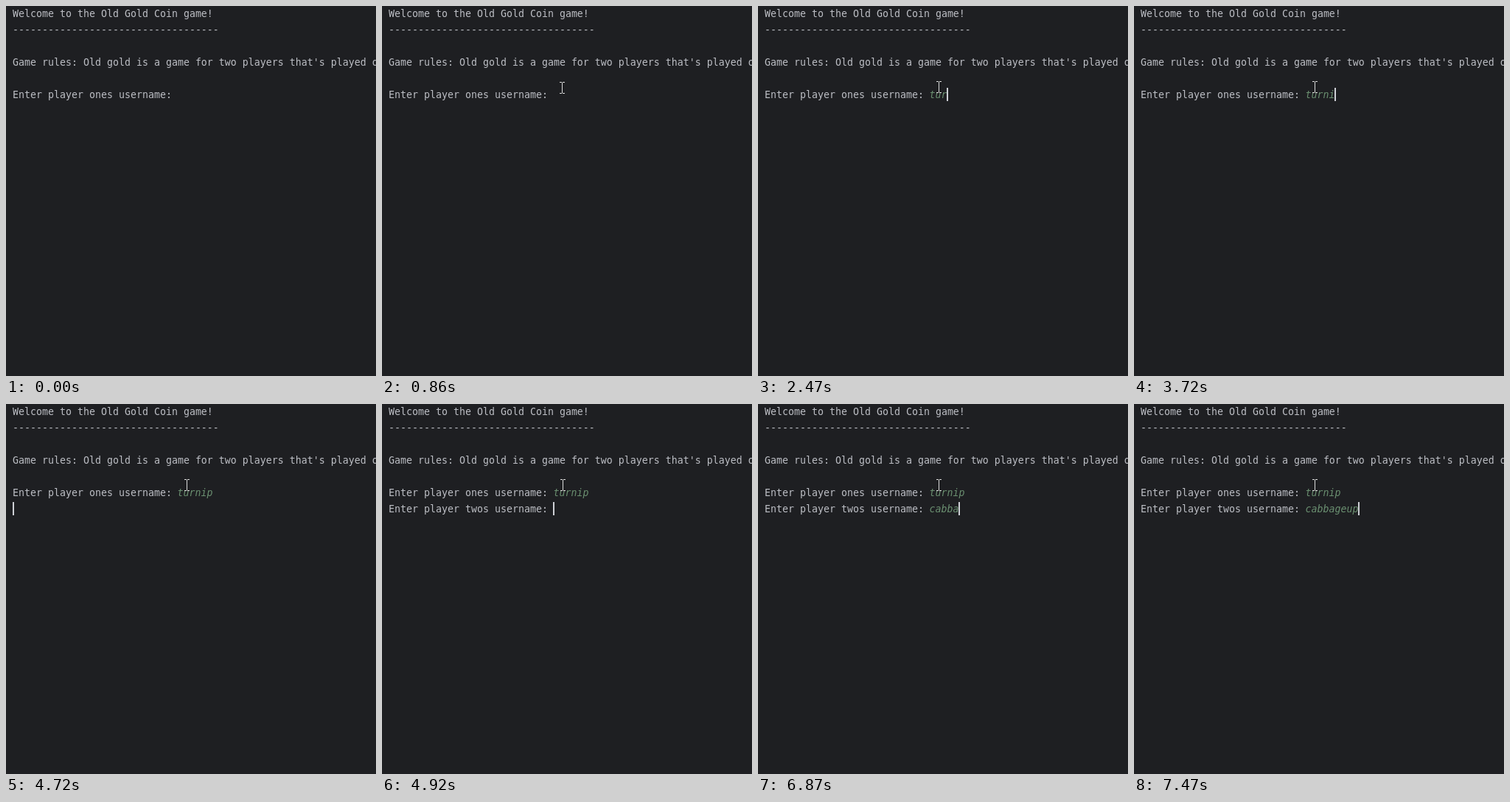
An HTML page with a canvas that plays this animation: 502 px wide and 502 px high, repeating every 8 s.

```html
<!DOCTYPE html>
<html lang="en">
<head>
<meta charset="utf-8">
<title>Coin game console</title>
<style>
  html, body { margin: 0; width: 100%; height: 100%; overflow: hidden; background: #1e1f22; }
  canvas { display: block; }
</style>
</head>
<body>
<canvas id="stage" width="502" height="502"></canvas>
<script>
const ctx = document.getElementById('stage').getContext('2d', { alpha: false });
const LOOP = 8000;
const LEFT = 9, ROW = 22, CELL = 8, INPUT_X = 232;
const FONT = '13.29px "DejaVu Sans Mono", monospace';
const COLORS = { back: '#1e1f22', output: '#bcbec4', input: '#6a8f70', caret: '#ced0d6', mouse: '#dcdcdc' };

const INTRO = [
  'Welcome to the Old Gold Coin game!',
  '-'.repeat(35),
  '',
  "Game rules: Old gold is a game for two players that's played on",
  '',
  'Enter player ones username:'
];
const SECOND_PROMPT = 'Enter player twos username:';

// One key time per letter.
const FIRST = { text: 'turnip ', row: 5, keys: [2000, 2190, 2470, 3000, 3720, 3860, 3990] };
const SECOND = { text: 'cabbageup', row: 6, keys: [6120, 6180, 6390, 6600, 6870, 7140, 7260, 7260, 7470] };
const FOCUS = 1130, ENTER = 4720, PROMPT = 4920;

const MOUSE_IN = 660, MOUSE_NUDGE = 1000, MOUSE_STEP = 65;

function write(text, x, row, color, style = '') {
  ctx.font = style + FONT;
  ctx.fillStyle = color;
  ctx.fillText(text, x, 15 + row * ROW);
}

function drawCaret(x, row) {
  ctx.fillStyle = COLORS.caret;
  ctx.fillRect(x, 1 + row * ROW, 2, 18);
}

// Draws the typed letters and returns how many there are.
function drawInput({ text, row, keys }, t) {
  const count = keys.filter(key => key <= t).length;
  write(text.slice(0, count), INPUT_X + 0.5, row, COLORS.input, 'italic ');
  return count;
}

// Progress from 0 to 1 in three coarse pointer updates.
const progress = time => Math.max(0, Math.min(1, Math.floor(time / MOUSE_STEP) / 3));

// The pointer glides in, then hops slightly up and settles.
function drawPointer(t) {
  if (t < MOUSE_IN) return;
  const glide = 1 - (1 - progress(t - MOUSE_IN)) ** 2;
  const nudge = progress(t - MOUSE_NUDGE + MOUSE_STEP);
  const x = Math.round(342 - 98 * glide + nudge);
  const y = Math.round(278 - 175 * glide - nudge - 5 * Math.sin(Math.PI * nudge));

  ctx.fillStyle = COLORS.mouse;
  for (const end of [y, y + 15]) {
    ctx.fillRect(x - 3, end, 3, 1);
    ctx.fillRect(x + 1, end, 3, 1);
  }
  ctx.fillRect(x, y + 1, 1, 14);
}

function draw(t) {
  ctx.fillStyle = COLORS.back;
  ctx.fillRect(0, 0, 502, 502);
  INTRO.forEach((line, row) => write(line, LEFT, row, COLORS.output));

  const first = drawInput(FIRST, t);
  if (t >= PROMPT) {
    write(SECOND_PROMPT, LEFT, SECOND.row, COLORS.output);
    drawCaret(INPUT_X + CELL * drawInput(SECOND, t), SECOND.row);
  } else if (t >= ENTER) {
    drawCaret(LEFT, SECOND.row);
  } else if (t >= FOCUS) {
    drawCaret(INPUT_X + CELL * first, FIRST.row);
  }
  drawPointer(t);
}

const start = performance.now();
function tick() {
  draw((performance.now() - start) % LOOP);
  requestAnimationFrame(tick);
}
tick();
</script>
</body>
</html>
```
